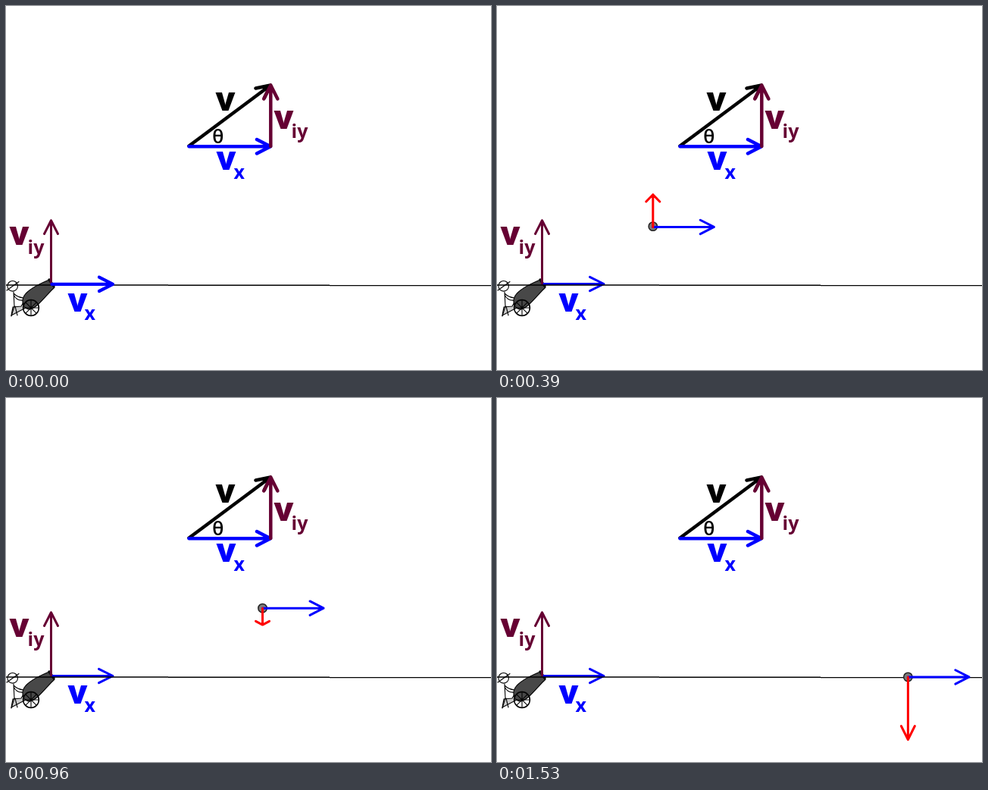
An HTML page that plays this animation: 640x480 px, repeating every 2.25 s.

```html
<!DOCTYPE html>
<html lang="en">
<head>
<meta charset="utf-8">
<title>Projectile velocity components</title>
<style>
html, body { margin: 0; width: 100%; height: 100%; overflow: hidden; background: #fff; }
svg { display: block; width: 640px; height: 480px; }
text { font-family: "Open Sans", "Noto Sans", sans-serif; font-weight: 700; }
.big { font-size: 42.5px; font-weight: 800; }
.sub { font-size: 25px; }
.arrow { fill: none; stroke-linecap: round; stroke-linejoin: round; stroke-width: 3; }
.thick { stroke-width: 4.5; }
.blue { stroke: #00f; }
.plum { stroke: #603; }
.red { stroke: #f00; }
.ink { stroke: #000; }
.thin { stroke: #000; stroke-width: 1.1; fill: none; stroke-linecap: round; }
</style>
</head>
<body>
<svg viewBox="0 0 640 480">
  <g id="cannon">
    <path class="thin" d="M10 377L11 396M10 379Q15 384 23 385M10 381Q14 389 23 388"/>
    <path class="thin" style="fill:#ccc" d="M9 397L20 396L24 389L26 398L7 408Z"/>
    <path class="thin" d="M11 396L7 409M12 396L15 408"/>
    <circle class="thin" style="fill:#fff" cx="8.7" cy="369.3" r="6.8"/>
    <path class="thin" d="M1 375L17 363.5"/>
    <path class="thin" style="fill:#484848" d="M57 361C45 366 29 374 24 382C20 389 22 399 31 400C41 399 53 381 64 371Z"/>
    <path d="M57 361L63 369.5" stroke="#111" stroke-width="3.4" stroke-linecap="round"/>
    <circle class="thin" style="stroke-width:1.5" cx="33" cy="398" r="10.4"/>
    <path class="thin" id="spokes"/>
  </g>

  <path class="arrow blue" d="M60 366.5H141M122.5 357.3L141 366.5L122.5 375.7"/>
  <path class="arrow plum" d="M59.5 366V282.8M50.5 300.5L59.5 282.8L68.5 300.5"/>
  <path d="M0 368H214M214 368.3H427M427 368.6H640" stroke="#000" stroke-width="1.4"/>

  <path class="arrow thick ink" d="M241.5 184.5L349 104.5M329.5 108.5L349 104.5L341 121"/>
  <path class="arrow thick blue" d="M241.5 185.2H349M331 176L349 185.2L331 194.5"/>
  <path class="arrow thick plum" d="M349.3 185V104.5M340.2 122.5L349.3 104.5L358.4 122.5"/>

  <text class="big" x="276.5" y="138">v</text>
  <text x="272.3" y="181" font-size="25" style="font-weight:600">θ</text>
  <g fill="#603">
    <text class="big" x="353.5" y="162">v</text><text class="sub" x="376.5" y="174">iy</text>
    <text class="big" x="4.5" y="315">v</text><text class="sub" x="28.5" y="327">iy</text>
  </g>
  <g fill="#00f">
    <text class="big" x="277.5" y="216">v</text><text class="sub" x="300.5" y="228">x</text>
    <text class="big" x="81.5" y="403">v</text><text class="sub" x="103.5" y="414">x</text>
  </g>

  <circle id="ball" r="5.7" fill="#7b7b7b" stroke="#222" stroke-width="1.5"/>
  <path id="across" class="arrow blue"/>
  <path id="fall" class="arrow red"/>
</svg>
<script>
const LOOP = 2250, STEP = 30, LAST = 51, TOP = 27;
const FULL = 82.5;
const $ = id => document.getElementById(id);
const ball = $("ball"), across = $("across"), fall = $("fall");

let spokes = "";
for (let i = 0; i < 4; i++) {
  const a = i * Math.PI / 4, c = 10 * Math.cos(a), s = 10 * Math.sin(a);
  spokes += `M${33 - c} ${398 - s}L${33 + c} ${398 + s}`;
}
$("spokes").setAttribute("d", spokes);

// Position and signed vertical velocity (up is negative) at step n
function flight(n) {
  if (n < TOP) {
    const x = 60.5 + n * (12.069 - 0.0309 * n - 0.0029 * n * n);
    const u = 303 - x;
    return { x, y: 275 + u * u * (0.00172 - 6.5e-7 * u),
             lift: 0.8 * Math.sin(Math.PI * n / TOP), vy: FULL * (n / TOP - 1) };
  }
  const m = n - TOP, x = 306.8 + 5.435 * m + 0.1825 * m * m;
  return { x, y: 275.1 + 0.00162 * (x - 303) ** 2, lift: 0, vy: 6 + 3.19 * m };
}

function draw(t) {
  const n = Math.min(LAST, Math.floor(t % LOOP / STEP));
  const { x, y, lift, vy } = flight(n);
  const ay = y + lift, tip = ay + vy, wing = tip - vy * 0.218, right = x + 80.5;
  const shown = n > 0 ? "visible" : "hidden";

  ball.setAttribute("cx", x);
  ball.setAttribute("cy", y);
  ball.setAttribute("visibility", shown);
  fall.setAttribute("visibility", shown);
  fall.setAttribute("d", `M${x} ${ay}V${tip}M${x - 9} ${wing}L${x} ${tip}L${x + 9} ${wing}`);
  across.setAttribute("d", `M${x} ${ay}H${right}M${right - 18} ${ay - 9.2}L${right} ${ay}L${right - 18} ${ay + 9.2}`);
  across.style.strokeWidth = n > 0 ? 3 : 4.2;
}

const start = performance.now();
function tick() {
  draw(performance.now() - start);
  requestAnimationFrame(tick);
}
tick();
</script>
</body>
</html>
```
